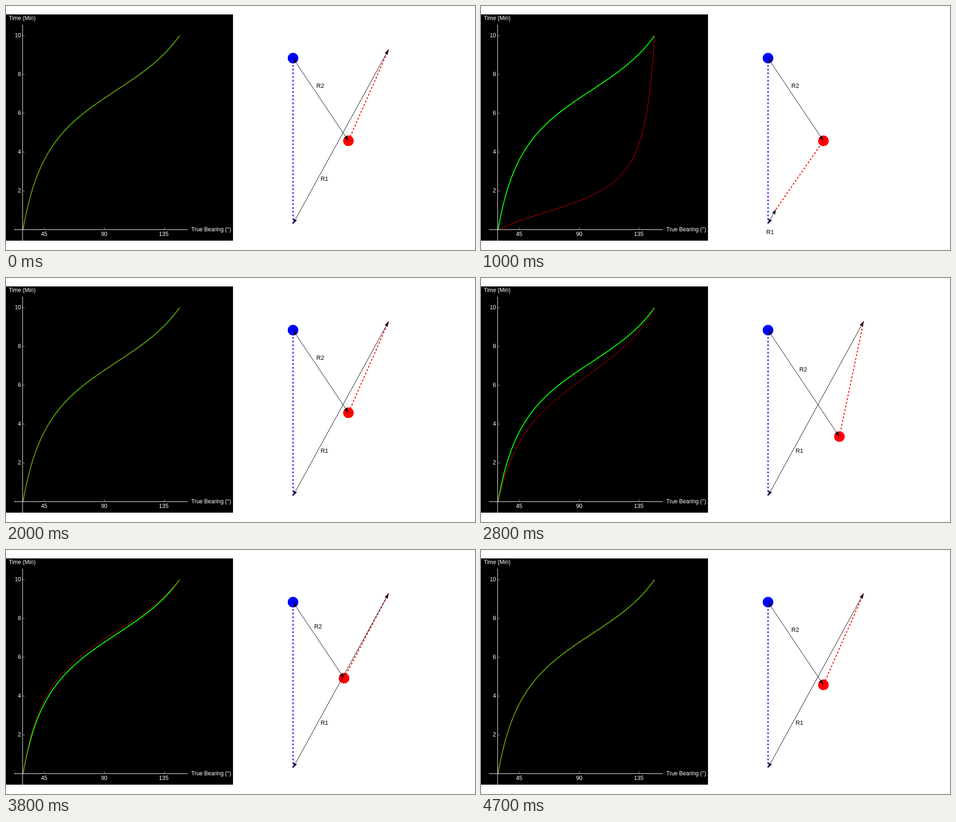
An HTML page with a canvas for the animation above (5300 ms loop, 1000 by 522 pixels).

```html
<!DOCTYPE html>
<html lang="en">
<head>
<meta charset="utf-8">
<title>Bearing over time for varying ranges</title>
<style>
  html, body { margin: 0; width: 100%; height: 100%; overflow: hidden; background: #fff; }
  canvas { display: block; }
</style>
</head>
<body>
<canvas id="stage" width="1000" height="522"></canvas>
<script>
const ctx = document.getElementById('stage').getContext('2d');
const LOOP = 5300, STEP = 100;
const UNIT = 35.44;                       // pixels per unit of range
const START = { x: 612, y: 466 };         // observer at minute 0
const END = { x: 612, y: START.y - 10 * UNIT };
const RANGE_1 = 12, RANGE_2 = 6;
const rad = deg => deg * Math.PI / 180;
const BEARING_1 = rad(28.65), BEARING_2 = rad(146.25);

const offset = (range, bearing) => ({
  x: range * UNIT * Math.sin(bearing),
  y: -range * UNIT * Math.cos(bearing)
});
const add = (a, b, k = 1) => ({ x: a.x + b.x * k, y: a.y + b.y * k });

// Smooth 0 -> 1 -> 0 over the given span
function swing(t, begin, length) {
  const u = (t - begin) / length;
  return u <= 0 || u >= 1 ? 0 : (1 - Math.cos(2 * Math.PI * u)) / 2;
}

function line(a, b, color, width, dash = []) {
  ctx.strokeStyle = color;
  ctx.lineWidth = width;
  ctx.setLineDash(dash);
  ctx.beginPath();
  ctx.moveTo(a.x, a.y);
  ctx.lineTo(b.x, b.y);
  ctx.stroke();
  ctx.setLineDash([]);
}

function segment(x1, y1, x2, y2, color = '#fff') {
  line({ x: x1, y: y1 }, { x: x2, y: y2 }, color, 1);
}

function text(label, x, y, color, align = 'left', size = 12) {
  ctx.font = `${size}px "Liberation Sans", Arial, sans-serif`;
  ctx.fillStyle = color;
  ctx.textAlign = align;
  ctx.fillText(label, x, y);
}

function disc(p, color) {
  ctx.fillStyle = color;
  ctx.beginPath();
  ctx.arc(p.x, p.y, 11.3, 0, 2 * Math.PI);
  ctx.fill();
}

function arrowHead(tip, angle) {
  ctx.save();
  ctx.translate(tip.x, tip.y);
  ctx.rotate(angle);
  ctx.fillStyle = '#000';
  ctx.beginPath();
  ctx.moveTo(0, 0);
  ctx.lineTo(-11.5, -3.8);
  ctx.lineTo(-9.5, 0);
  ctx.lineTo(-11.5, 3.8);
  ctx.fill();
  ctx.restore();
}

function doubleArrow(a, b) {
  const angle = Math.atan2(b.y - a.y, b.x - a.x);
  const inset = { x: Math.cos(angle) * 4, y: Math.sin(angle) * 4 };
  line(add(a, inset), add(b, inset, -1), '#000', 1);
  arrowHead(b, angle);
  arrowHead(a, angle + Math.PI);
}

const plotX = degrees => 210.3 + (degrees - 90) * 2.835;
const plotY = minutes => 478.5 - minutes * 41.5;

function bearingCurve(r1, r2, color, width) {
  const from = offset(r1, BEARING_1), to = offset(r2, BEARING_2);
  ctx.strokeStyle = color;
  ctx.lineWidth = width;
  ctx.beginPath();
  for (let i = 0; i <= 200; i++) {
    const u = i / 200;
    const x = from.x * (1 - u) + to.x * u, y = from.y * (1 - u) + to.y * u;
    ctx.lineTo(plotX(Math.atan2(x, -y) * 180 / Math.PI), plotY(10 * u));
  }
  ctx.stroke();
}

function drawPlot(r1, r2) {
  ctx.fillStyle = '#000';
  ctx.fillRect(0, 18, 484, 484);
  bearingCurve(RANGE_1, RANGE_2, '#0f0', 2);
  bearingCurve(r1, r2, '#f00', 0.9);

  segment(35.5, 40, 35.5, 502);
  segment(17, 478.5, 388, 478.5);
  for (let m = 2; m <= 10; m += 2) {
    segment(36, plotY(m), 40, plotY(m), '#999');
    text(m, 32, plotY(m) + 3.5, '#fff', 'right');
  }
  for (let d = 45; d <= 135; d += 45) {
    const x = Math.floor(plotX(d)) + 0.5;
    segment(x, 474, x, 478, '#999');
    text(d, x - 1.2, 492, '#fff', 'center');
  }
  text('Time (Min)', 6, 30, '#fff');
  text('True Bearing (°)', 395, 482, '#fff');
}

function drawMap(r1, r2) {
  const v1 = offset(r1, BEARING_1), v2 = offset(r2, BEARING_2);
  const targetStart = add(START, v1), targetEnd = add(END, v2);
  line(START, END, '#00f', 2, [4, 4]);
  line(targetStart, targetEnd, '#f00', 2, [4, 4]);
  disc(END, '#00f');
  disc(targetEnd, '#f00');
  doubleArrow(START, targetStart);
  doubleArrow(END, targetEnd);
  const label1 = add(START, v1, 1 / 3), label2 = add(END, v2, 1 / 2);
  text('R1', label1.x - 1, label1.y + 32, '#000', 'center', 13);
  text('R2', label2.x - 1, label2.y - 25, '#000', 'center', 13);
}

function draw(now) {
  const t = Math.floor((now % LOOP) / STEP) * STEP;
  const r1 = RANGE_1 - 11 * swing(t, 0, 2000);
  const r2 = RANGE_2 + 5 * (swing(t, 2600, 1000) - swing(t, 3700, 1000));
  ctx.fillStyle = '#fff';
  ctx.fillRect(0, 0, 1000, 522);
  drawPlot(r1, r2);
  drawMap(r1, r2);
}

let origin;
function tick(now) {
  origin ??= now;
  draw(now - origin);
  requestAnimationFrame(tick);
}
draw(0);
requestAnimationFrame(tick);
</script>
</body>
</html>
```
